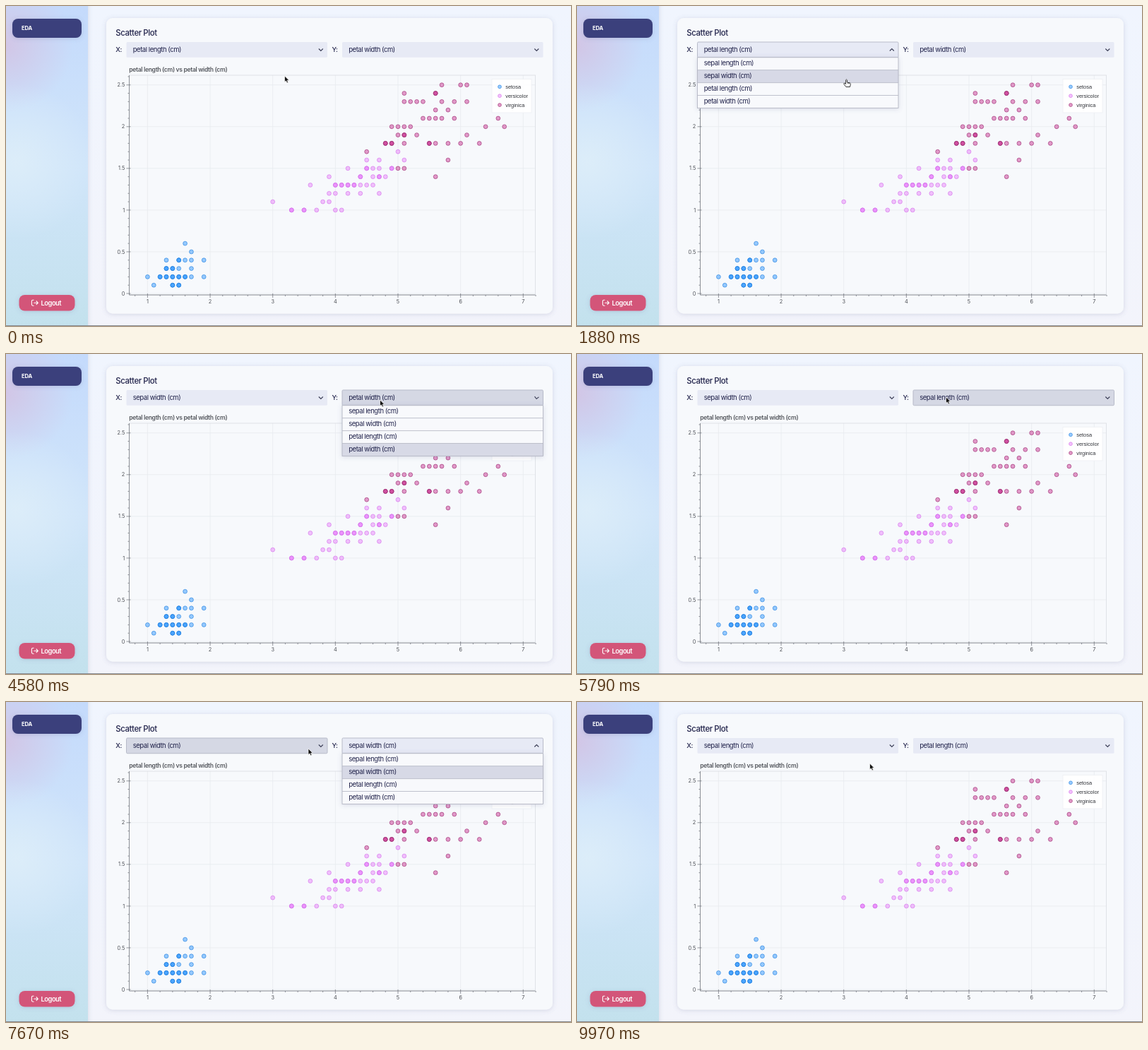
An HTML page that plays this animation: 800 by 453 pixels, repeating every 10 s.

```html
<!DOCTYPE html>
<html lang="en">
<head>
<meta charset="utf-8">
<title>Scatter Plot</title>
<style>
  html, body { margin: 0; width: 100%; height: 100%; overflow: hidden; }
  svg { display: block; width: 800px; height: 453px; }
  text { font-family: Inter, sans-serif; font-size: 9.5px; letter-spacing: -.45px; fill: #20224a; }
  .heading { font-size: 11.4px; font-weight: 500; letter-spacing: -.4px; }
  .title { font-size: 8.6px; font-weight: 600; letter-spacing: -.35px; fill: #55585e; }
  .tick { font-size: 7.3px; letter-spacing: 0; fill: #4c4f55; }
  .legend { font: 7.45px "Liberation Sans", Arial, sans-serif; letter-spacing: 0; fill: #303238; }
  .button { fill: #fff; font-weight: 600; }
</style>
</head>
<body>
<svg viewBox="0 0 800 453">
  <defs>
    <linearGradient id="page" x2="0" y2="1">
      <stop stop-color="#f0f5fe"/><stop offset="1" stop-color="#f3f4fb"/>
    </linearGradient>
    <linearGradient id="side" x2="0" y2="1">
      <stop stop-color="#c3d9fc"/><stop offset=".5" stop-color="#d0e5fa"/><stop offset="1" stop-color="#c2e1ec"/>
    </linearGradient>
    <radialGradient id="pink" gradientUnits="userSpaceOnUse" cx="0" cy="55" r="95">
      <stop stop-color="#d2c6e6"/><stop offset="1" stop-color="#d2c6e6" stop-opacity="0"/>
    </radialGradient>
    <radialGradient id="glow" gradientUnits="userSpaceOnUse" cx="15" cy="220" r="110">
      <stop stop-color="#dcedf9"/><stop offset="1" stop-color="#dcedf9" stop-opacity="0"/>
    </radialGradient>
    <filter id="soft" x="-20%" y="-20%" width="140%" height="150%">
      <feDropShadow dx="0" dy="1" stdDeviation="3" flood-color="#5a6490" flood-opacity=".22"/>
    </filter>
  </defs>

  <rect width="800" height="453" fill="url(#page)"/>
  <g filter="url(#soft)"><rect y="-20" width="116" height="493" fill="url(#side)"/></g>
  <rect width="116" height="453" fill="url(#pink)"/>
  <rect width="116" height="453" fill="url(#glow)"/>
  <rect x="9" y="18" width="98" height="27" rx="8" fill="#3a3f7b" filter="url(#soft)"/>
  <text class="button" x="22" y="34" style="font-size:7.7px;letter-spacing:-.2px;font-weight:700">EDA</text>
  <rect x="18.5" y="409" width="79" height="22.5" rx="8" fill="#d35579" filter="url(#soft)"/>
  <path d="M39.5 416.2H38q-1.6 0-1.6 1.6v4.8q0 1.6 1.6 1.6h1.5M39.3 420.2h5.8M42.7 417.5l2.6 2.7-2.6 2.7" fill="none" stroke="#fff" stroke-width="1.1"/>
  <text class="button" x="49.5" y="423.6" style="font-size:9.3px">Logout</text>

  <rect x="142" y="17" width="632" height="418.5" rx="9" fill="#f7f9fc" filter="url(#soft)"/>
  <text class="heading" x="155.3" y="41.8">Scatter Plot</text>
  <text x="155.3" y="65.3" font-weight="500">X:</text>
  <text x="461.5" y="65.3" font-weight="500">Y:</text>

  <text class="title" x="174.3" y="92.8">petal length (cm) vs petal width (cm)</text>
  <g id="axes"></g>
  <g id="points"></g>
  <g id="legend"></g>
  <g id="selects"></g>
  <g id="menu" filter="url(#soft)"></g>
  <path d="M0 452.5H800" stroke="#85888e"/>

  <path id="arrow" d="M0 0V8.6L2 6.9 3.4 10 5 9.3 3.7 6.3H6.3Z" fill="#111" stroke="#fff" stroke-width=".7"/>
  <path id="hand" d="M-.9.8Q0-.8.9.8V4L5 5Q6 5.3 5.8 6.6L5 10.5H-.6L-3.7 6.4Q-3.8 5-2.5 5.3L-.9 6.5ZM2.2 4.3v1.6M3.8 4.7v1.4" fill="#fff" stroke="#222" stroke-width=".9" stroke-linejoin="round"/>
</svg>
<script>
const $ = id => document.getElementById(id);
const options = ['sepal length (cm)', 'sepal width (cm)', 'petal length (cm)', 'petal width (cm)'];
const px = x => 200.4 + 88.65 * (x - 1);
const py = y => 407 - 118.1 * y;

// Axes, ticks and grid
let grid = '', ticks = '', labels = '';
for (let i = 4; i <= 36; i++) {
  const x = px(i / 5), major = i % 5 === 0;
  ticks += `M${x} ${major ? 407 : 409}V${major ? 413 : 411}`;
  if (major) {
    grid += `M${x} 98V409`;
    labels += `<text class="tick" x="${x}" y="420.8" text-anchor="middle">${i / 5}</text>`;
  }
}
for (let i = 0; i <= 26; i++) {
  const y = py(i / 10), major = i % 5 === 0;
  ticks += `M${major ? 176.5 : 174.5} ${y}H${major ? 170.5 : 172.5}`;
  if (major) {
    grid += `M174.5 ${y}H749.5`;
    labels += `<text class="tick" x="168.3" y="${y + 2.6}" text-anchor="end">${i / 10}</text>`;
  }
}
$('axes').innerHTML = `<path d="${grid}" stroke="#e8ebef" stroke-width=".8"/>
  <rect x="174.5" y="98" width="575" height="311" fill="none" stroke="#dfe2e7"/>
  <path d="M174.5 98V409H749.5${ticks}" fill="none" stroke="#70747b" stroke-width=".75"/>${labels}`;

// Rows of petal lengths (mm) by petal width (mm); "a-b" is a run, "*" marks coinciding samples
const species = [
  { name: 'setosa', fill: '#3399ff', stroke: '#2b86e0', rows: {
    1: '11 14* 15*', 2: '10 12* 13-16* 17 19', 3: '13* 14* 15 17', 4: '13 15* 16 17 19', 5: '17', 6: '16' } },
  { name: 'versicolor', fill: '#ea86fb', stroke: '#d678ea', rows: {
    10: '33* 35* 37 40 41', 11: '30 38 39', 12: '39 40 42 44 47', 13: '36 40-43* 44-46',
    14: '39 44* 46 47* 48', 15: '42 45* 46 47 49*', 16: '45 47 51', 17: '50' } },
  { name: 'virginica', fill: '#cc3a96', stroke: '#a03878', rows: {
    14: '56', 15: '50 51', 16: '58', 17: '45', 18: '48* 49* 51 55* 56 58 60 63', 19: '50 51* 53 61',
    20: '49-52 64 67', 21: '54-57 59 66', 22: '56 58', 23: '51-54 57 59 61', 24: '51 56*', 25: '57 60 61' } }
];
const dot = (x, y, s, r = 2.9) =>
  `<circle cx="${x}" cy="${y}" r="${r}" fill="${s.fill}" fill-opacity=".5" stroke="${s.stroke}" stroke-opacity=".85" stroke-width=".8"/>`;
let dots = '', legend = '<rect x="688" y="103.5" width="56" height="47.5" fill="#fff" fill-opacity=".95" stroke="#eceef2" stroke-width=".7"/>';
species.forEach((s, i) => {
  for (const [width, row] of Object.entries(s.rows)) {
    for (const run of row.split(' ')) {
      const [first, last = first] = run.replace('*', '').split('-').map(Number);
      for (let n = first; n <= last; n++)
        dots += dot(px(n / 10), py(width / 10), s).repeat(run.endsWith('*') ? 3 : 1);
    }
  }
  const y = 114.3 + 12.9 * i;
  legend += dot(699, y, s, 2.4) + `<text class="legend" x="707.2" y="${y + 2.6}">${s.name}</text>`;
});
$('points').innerHTML = dots;
$('legend').innerHTML = legend;

// Select boxes and the shared drop-down list
const lefts = [170.5, 476];
$('selects').innerHTML = lefts.map(x => `<g transform="translate(${x} 51)">
  <rect width="284.5" height="21.8" rx="1.5" stroke-width=".9"/><text x="9.2" y="14.3"></text>
  <path d="M-3 -1.5L0 1.5 3 -1.5" fill="none" stroke="#3a3d55" stroke-width="1.1"/></g>`).join('');
const boxes = [...$('selects').children].map(g => ({
  rect: g.querySelector('rect'), label: g.querySelector('text'), chevron: g.querySelector('path') }));
const top0 = 72.8, itemH = 17.9;
$('menu').innerHTML = `<rect y="${top0}" width="284.5" height="${itemH * 4}" fill="#f8f9fc"/>
  <rect id="mark" width="284.5" height="${itemH}" fill="#d7d9e6"/>
  <path d="${[1, 2, 3].map(i => `M0 ${top0 + i * itemH}H284.5`).join('')}" stroke="#b9bcc8" stroke-width=".9"/>
  <rect y="${top0}" width="284.5" height="${itemH * 4}" fill="none" stroke="#b3b6c3" stroke-width=".9"/>` +
  options.map((o, i) => `<text x="9.2" y="${84 + i * itemH}">${o}</text>`).join('');

// [time, open select (-1: none), X option, Y option]
const states = [
  [0, -1, 2, 3], [1200, 0, 2, 3], [2100, -1, 1, 3], [2740, 1, 1, 3], [3700, -1, 1, 3],
  [4575, 1, 1, 3], [5300, -1, 1, 0], [5950, 1, 1, 0], [6600, -1, 1, 1], [7250, 1, 1, 1],
  [7800, 0, 1, 1], [8250, -1, 0, 1], [8650, 1, 0, 1], [9150, -1, 0, 2]
];
// [time, x, y] of the pointer tip
const path = [
  [0, 394.5, 99], [400, 394.5, 99], [1000, 400, 64], [1250, 400, 64], [1800, 381.5, 104], [2120, 381.5, 104],
  [2650, 546.5, 62], [2900, 546.5, 62], [3450, 540, 134], [3750, 540, 134], [4450, 529.5, 65], [4700, 529.5, 65],
  [5150, 525, 81], [5350, 525, 81], [5720, 522.5, 61], [6050, 522.5, 61], [6450, 522, 99], [6650, 522, 99],
  [7050, 522, 62], [7300, 522, 62], [7670, 428, 66], [7850, 420, 64], [8100, 415, 81], [8300, 415, 81],
  [8560, 540, 62], [8720, 540, 62], [9030, 535, 116], [9200, 535, 116], [9800, 414.5, 87], [10000, 414.5, 87]
];

function pointer(t) {
  const i = path.findIndex(p => p[0] > t), [t0, x0, y0] = path[i - 1], [t1, x1, y1] = path[i];
  const u = (t - t0) / (t1 - t0), k = u * u * (3 - 2 * u);
  return [x0 + (x1 - x0) * k, y0 + (y1 - y0) * k];
}

function draw(now) {
  const t = now % 10000, [mx, my] = pointer(t);
  const index = states.findLastIndex(s => s[0] <= t);
  const [since, open, ...values] = states[index];
  const wasOpen = index ? states[index - 1][1] : -1;
  const turn = Math.min(1, (t - since) / 150);
  const inColumn = i => mx >= lefts[i] && mx <= lefts[i] + 284.5;

  boxes.forEach(({ rect, label, chevron }, i) => {
    const hover = inColumn(i) && my > 51 && my < top0;
    const from = wasOpen === i ? 180 : 0, to = open === i ? 180 : 0;
    rect.setAttribute('fill', hover ? '#d5d8e4' : '#e7eaf5');
    rect.setAttribute('stroke', hover || open === i ? '#b3b6c4' : 'none');
    label.textContent = options[values[i]];
    chevron.setAttribute('transform', `translate(275.3 11) rotate(${from + (to - from) * turn})`);
  });

  const item = Math.floor((my - top0) / itemH);
  const inMenu = open >= 0 && inColumn(open) && item >= 0 && item < 4;
  $('menu').style.display = open < 0 ? 'none' : '';
  if (open >= 0) {
    $('menu').setAttribute('transform', `translate(${lefts[open]} 0)`);
    $('mark').setAttribute('y', top0 + itemH * (inMenu ? item : values[open]));
  }

  for (const [id, shown] of [['arrow', !inMenu], ['hand', inMenu]]) {
    $(id).style.display = shown ? '' : 'none';
    $(id).setAttribute('transform', `translate(${mx} ${my})`);
  }
}

function frame() {
  draw(performance.now());
  requestAnimationFrame(frame);
}
frame();
</script>
</body>
</html>
```
